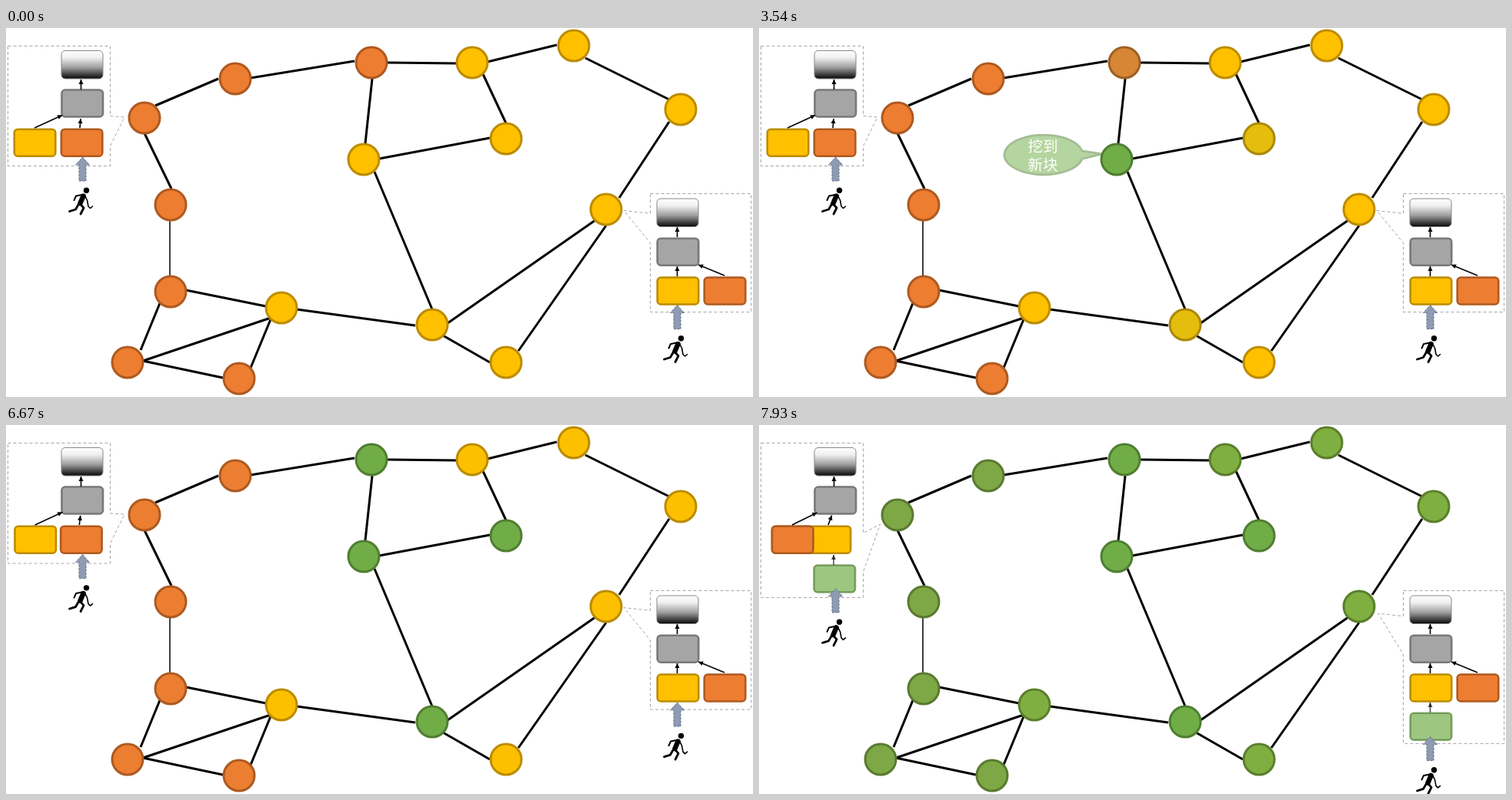
Recreate the animation shown at these times as an HTML page with a canvas. Size 971 by 480 pixels, loop 8 s.

```html
<!DOCTYPE html>
<html lang="zh">
<head>
<meta charset="utf-8">
<style>
  html, body { margin: 0; width: 100%; height: 100%; overflow: hidden; background: #fff; }
  canvas { display: block; }
</style>
</head>
<body>
<canvas id="stage" width="971" height="480"></canvas>
<script>
const c = document.getElementById('stage').getContext('2d');
const LOOP = 8000;

// Each colour: fill and outline
const ORANGE = [[237, 125, 49], [174, 90, 33]];
const YELLOW = [[255, 192, 0], [188, 140, 0]];
const GREEN = [[112, 173, 71], [80, 126, 50]];
const GREY = [[165, 165, 165], [120, 120, 120]];

// x, y, start colour, wave in which the block arrives
const nodes = [
  [180, 117, ORANGE, 2], [298, 66, ORANGE, 2], [475, 45, ORANGE, 1],
  [214, 230, ORANGE, 2], [214, 343, ORANGE, 2], [158, 435, ORANGE, 2],
  [303, 456, ORANGE, 2], [465, 171, YELLOW, 0], [606, 45, YELLOW, 2],
  [738, 23, YELLOW, 2], [877, 106, YELLOW, 2], [650, 144, YELLOW, 1],
  [780, 236, YELLOW, 2], [358, 364, YELLOW, 2], [554, 386, YELLOW, 1],
  [650, 435, YELLOW, 2]
];
const waves = [[1705, 485], [3285, 1420], [6655, 1420]];

const edges = [
  [194, 101, 276, 66], [318, 65, 453, 43], [496, 45, 585, 46],
  [626, 44, 716, 22], [753, 39, 862, 93], [862, 122, 797, 221],
  [620, 60, 650, 124], [476, 66, 467, 150], [485, 170, 629, 143],
  [479, 187, 554, 366], [180, 137, 215, 209], [234, 341, 338, 362],
  [200, 358, 175, 419], [178, 433, 344, 377], [178, 433, 282, 455],
  [318, 442, 344, 379], [378, 366, 532, 387], [574, 384, 766, 250],
  [780, 257, 666, 420], [568, 400, 629, 435]
];

const clamp = v => Math.max(0, Math.min(1, v));
const progress = (t, start, length) => clamp((t - start) / length);
const lerp = (a, b, p) => a + (b - a) * p;
const rgb = v => `rgb(${v.map(Math.round)})`;
const mix = (a, b, p) => a.map((part, i) => part.map((v, j) => lerp(v, b[i][j], p)));

function trace(points, close) {
  c.beginPath();
  for (let i = 0; i < points.length; i += 2) c.lineTo(points[i], points[i + 1]);
  if (close) c.closePath();
}

function line(points, width, color = '#000') {
  trace(points);
  c.lineWidth = width;
  c.strokeStyle = color;
  c.stroke();
}

function paint(color, width) {
  c.fillStyle = rgb(color[0]);
  c.strokeStyle = rgb(color[1]);
  c.lineWidth = width;
  c.fill();
  c.stroke();
}

function withAlpha(alpha, draw) {
  c.save();
  c.globalAlpha = alpha;
  draw();
  c.restore();
}

function block(x, y, color) {
  c.beginPath();
  c.roundRect(x, y, 53.5, 35, 4.5);
  paint(color, 2.6);
}

function gradientBlock(x, y) {
  const g = c.createLinearGradient(0, y, 0, y + 36);
  g.addColorStop(0, '#fff');
  g.addColorStop(0.25, '#f0f0f0');
  g.addColorStop(0.6, '#a0a0a0');
  g.addColorStop(1, '#0c0c0c');
  c.beginPath();
  c.roundRect(x, y, 54, 36.5, 5);
  c.fillStyle = g;
  c.fill();
  c.strokeStyle = '#888';
  c.lineWidth = 1;
  c.stroke();
}

function arrow(x1, y1, x2, y2) {
  line([x1, y1, x2, y2], 1.6);
  c.save();
  c.translate(x2, y2);
  c.rotate(Math.atan2(y2 - y1, x2 - x1));
  trace([0, 0, -6, -3, -6, 3], true);
  c.fillStyle = '#000';
  c.fill();
  c.restore();
}

function dashedOutline(points, color, dash) {
  c.setLineDash(dash);
  trace(points, true);
  c.lineWidth = 1;
  c.strokeStyle = color;
  c.stroke();
  c.setLineDash([]);
}

function blockArrow(x, y) {
  const shape = [x, y, x + 9, y + 10, x + 4.5, y + 10, x + 4.5, y + 31,
    x - 4.5, y + 31, x - 4.5, y + 10, x - 9, y + 10];
  trace(shape, true);
  c.fillStyle = '#8e9bb3';
  c.fill();
  dashedOutline(shape, '#5f6f8b', [3, 1.5]);
}

function runner(x, y) {
  c.save();
  c.translate(x, y);
  c.lineCap = c.lineJoin = 'round';
  c.beginPath();
  c.arc(24, 4.3, 3.7, 0, 7);
  c.fillStyle = '#000';
  c.fill();
  line([20, 11.5, 16, 21], 6.5);
  line([18, 10, 10.5, 11.5, 8, 17], 2);
  line([16, 22, 20.5, 27, 16.5, 35], 2.8);
  line([14, 22, 10, 29, 2, 31.5], 2.8);
  line([22, 11, 25, 17, 26.5, 25, 29, 27.5, 32, 25], 1.6);
  c.restore();
}

function visitor(x, y) {
  blockArrow(x, y);
  runner(x - 19, y + 39);
}

function leftPanel(p, fresh) {
  const bottom = 179.5 + 50 * p, h = bottom - 23.5;
  dashedOutline([2.5, 23.5, 135.5, 23.5, 135.5, 23.5 + h * 7 / 12,
    154 + 4 * p, 116 + 14.5 * p, 135.5, 23.5 + h * 5 / 6,
    135.5, bottom, 2.5, bottom], '#a6a6a6', [4, 3]);
  gradientBlock(72, 29.5);
  block(72.5, 80.5, GREY);
  const shift = 61 * p, orange = () => block(71.8 - shift, 131.7, ORANGE);
  orange();
  block(10.8 + shift, 131.7, YELLOW);
  withAlpha(clamp((p - 0.2) / 0.6), orange);
  arrow(97.5, 80, 97.5, 67);
  arrow(lerp(37, 96, p), 130, lerp(73, 97, p), lerp(113.5, 118, p));
  arrow(lerp(96, 37, p), 130, lerp(97, 73, p), lerp(118, 113.5, p));
  withAlpha(fresh, () => {
    block(71.5, 182.5, GREEN);
    arrow(97, 182, 97, 169);
  });
  visitor(99.5, 168 + 50 * p);
}

function rightPanel(p, fresh) {
  const bottom = 369.5 + 50 * p, h = bottom - 215.5;
  dashedOutline([837.5, 215.5, 968.5, 215.5, 968.5, bottom, 837.5, bottom,
    837.5, 215.5 + h * 5 / 12, 803 + 2 * p, 237.5 + 8.5 * p,
    837.5, 215.5 + h / 6], '#a6a6a6', [4, 3]);
  gradientBlock(846, 222);
  block(846.7, 273.7, GREY);
  block(846.7, 324.5, YELLOW);
  block(907.7, 324.5, ORANGE);
  arrow(872.5, 272, 872.5, 259);
  arrow(872.5, 323, 872.5, 310);
  arrow(934, 322, 900, 308);
  withAlpha(fresh, () => {
    block(846.7, 374.7, GREEN);
    arrow(872.5, 374, 872.5, 361);
  });
  visitor(872.5, 360.5 + 50 * p);
}

function bubble(t) {
  if (t < 1205 || t > 3800) return;
  c.lineJoin = 'round';
  c.beginPath();
  c.ellipse(370, 165, 51, 25.8, 0, 0.2, Math.PI * 2 - 0.2);
  c.lineTo(446, 164);
  c.closePath();
  paint(GREEN, 2.8);
  c.lineJoin = 'miter';
  c.fillStyle = '#fff';
  c.font = '300 19.5px "Noto Sans CJK SC", "Noto Sans CJK", sans-serif';
  c.textAlign = 'center';
  c.textBaseline = 'alphabetic';
  c.fillText('挖到', 369, 161);
  c.fillText('新块', 369, 185);

  // A white veil wipes the bubble in from the right and later fades it out
  const edge = 446 - 0.32 * (t - 1205);
  const veil = c.createLinearGradient(edge, 0, edge + 28, 0);
  veil.addColorStop(0, '#fff');
  veil.addColorStop(1, '#fff0');
  c.fillStyle = t < 1705 ? veil : `rgba(255,255,255,${progress(t, 3300, 500)})`;
  c.fillRect(310, 130, 138, 70);
}

function node([x, y, color, wave], t) {
  let r = 20, alpha = 1;
  if (wave === 0) {
    const q = progress(t, 705, 500);
    const swell = 1 - Math.abs(2 * q - 1);
    r *= 1 + 0.05 * swell;
    alpha = 1 - 0.5 * Math.min(1, swell / 0.4);
  }
  withAlpha(alpha, () => {
    c.beginPath();
    c.arc(x, y, r, 0, 7);
    paint(mix(color, GREEN, progress(t, ...waves[wave])), 3);
  });
}

function draw(t) {
  c.fillStyle = '#fff';
  c.fillRect(0, 0, 971, 480);
  const p = progress(t, ...waves[2]);
  const fresh = clamp((p - 0.68) / 0.32);
  leftPanel(p, fresh);
  rightPanel(p, fresh);
  edges.forEach(e => line(e, 3));
  line([213, 250, 213, 322], 1.5);
  bubble(t);
  nodes.forEach(n => node(n, t));
}

const begin = performance.now();
function tick() {
  draw((performance.now() - begin) % LOOP);
  requestAnimationFrame(tick);
}
tick();
</script>
</body>
</html>
```
